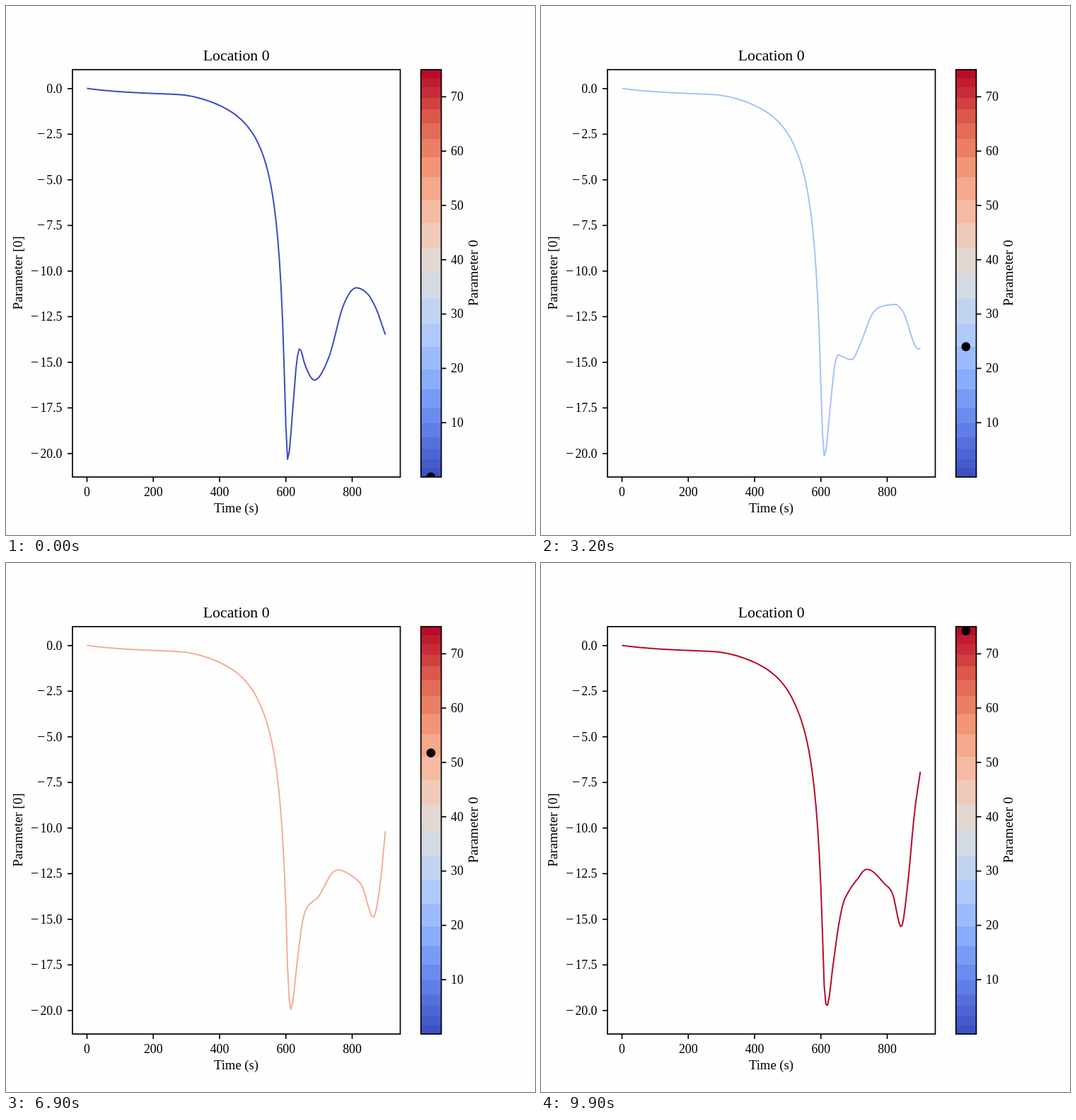
Animation, 748 px wide and 748 px high, one loop 10 s. Source, as an HTML page with a canvas:

```html
<!DOCTYPE html>
<html lang="en">
<head>
<meta charset="utf-8">
<title>Location 0</title>
<style>
html, body { margin: 0; width: 100%; height: 100%; overflow: hidden; background: #fefefe; }
canvas { display: block; }
</style>
</head>
<body>
<canvas id="stage" width="748" height="748"></canvas>
<script>
const ctx = document.getElementById('stage').getContext('2d');
const INK = '#000', PAPER = '#fefefe';
const LEFT = 94, TOP = 90, BOTTOM = 666, HEIGHT = BOTTOM - TOP;
const BAR = { x: 586.7, w: 28.8 };
const X0 = 114.5, STEP = 2.34375, SAMPLES = 180;
const FRAMES = 100, BANDS = 24;
const STOPS = [0x3b4cc0, 0x6282ea, 0x8db0fe, 0xb8d0f9, 0xdddddd, 0xf5c4ad, 0xf49a7b, 0xde604d, 0xb40426];

// Key points after the trough: x from, x to, y from, y to, bend on the way
const SHOULDER = [
  [406.3, 414.1, 560, 560, 0],
  [410.3, 421.3, 510, 510, 0],
  [415.2, 427, 484.5, 482, 38],
  [423, 434, 508, 466, 8],
  [436, 443, 529, 452, -18],
  [456, 449, 498, 444.5, -28],
  [478, 455, 421, 436, 41],
  [495, 461, 398.5, 433, 64]
];
const ENDING = [
  [513, 485, 409, 453, 10],
  [520, 497, 421, 468, -12],
  [552, 509, 492, 515, -50],
  [561, 518, 470, 456, 0],
  [570, 527.5, 400, 356, 0],
  [580, 538, 340, 282, 0]
];

const lerp = (a, b, t) => a + (b - a) * t;
const clamp = v => Math.max(0, Math.min(1, v));
const smooth = t => t * t * (3 - 2 * t);

function coolwarm(v) {
  const p = v * (STOPS.length - 1), i = Math.min(Math.floor(p), STOPS.length - 2);
  const mix = shift => Math.round(lerp(STOPS[i] >> shift & 255, STOPS[i + 1] >> shift & 255, p - i));
  return `rgb(${mix(16)},${mix(8)},${mix(0)})`;
}

// Monotone cubic interpolation: extrema lie only on the given points.
function spline(points) {
  const last = points.length - 1;
  const h = i => points[i + 1][0] - points[i][0];
  const sec = i => (points[i + 1][1] - points[i][1]) / h(i);
  const slope = i => {
    if (i === 0) return sec(0);
    if (i === last) return sec(last - 1);
    const a = sec(i - 1), b = sec(i);
    if (a * b <= 0) return 0;
    const p = (a * h(i) + b * h(i - 1)) / (h(i - 1) + h(i));
    return Math.sign(a) * Math.min(2 * Math.abs(a), 2 * Math.abs(b), Math.abs(p));
  };
  return x => {
    let i = 0;
    while (i < last - 1 && x > points[i + 1][0]) i++;
    const t = (x - points[i][0]) / h(i), u = 1 - t;
    return lerp(points[i][1], points[i + 1][1], smooth(t))
      + h(i) * t * u * (u * slope(i) - t * slope(i + 1));
  };
}

// A gentle saturating start that blends into a hyperbolic fall
function fall(x, drift) {
  const start = 116.5 + 10 * (1 - Math.exp((X0 - x) / 75));
  const pole = 405 + drift * clamp((x - 360) / 50);
  const plunge = 93 + 4900 / (pole - x);
  const blend = 1.5;
  return start + blend * Math.log1p(Math.exp((plunge - start) / blend));
}

function curveAt(u) {
  const early = u ** .75, drift = 5.8 * early;
  const trough = 398.2 + drift, join = trough - 4.5;
  const place = ease => ([xa, xb, ya, yb, bend]) =>
    [lerp(xa, xb, early), lerp(ya, yb, ease) + bend * early * (1 - early)];
  const tail = spline([
    [join - 2, fall(join - 2, drift)],
    [join, fall(join, drift)],
    [trough, lerp(641, 627, u)],
    ...SHOULDER.map(place(u)),
    ...ENDING.map(place(smooth(u)))
  ]);
  return x => x < join ? fall(x, drift) : tail(x);
}

function line(x1, y1, x2, y2) {
  ctx.beginPath();
  ctx.moveTo(x1, y1);
  ctx.lineTo(x2, y2);
  ctx.stroke();
}

function label(text, x, y, size, align = 'center', turned = false) {
  ctx.save();
  ctx.translate(x, y);
  if (turned) ctx.rotate(-Math.PI / 2);
  ctx.font = `${size}px "Liberation Serif", serif`;
  ctx.textAlign = align;
  ctx.fillText(text, 0, 0);
  const width = ctx.measureText(text).width;
  ctx.restore();
  return width;
}

function drawAxes() {
  ctx.strokeStyle = ctx.fillStyle = INK;
  ctx.lineWidth = 1.7;
  ctx.strokeRect(LEFT, TOP, 463.5, HEIGHT);
  ctx.strokeRect(BAR.x, TOP, BAR.w, HEIGHT);
  for (let s = 0; s <= 800; s += 200) {
    const x = X0 + s * .46875;
    line(x, BOTTOM, x, BOTTOM + 7);
    label(String(s), x, 692.5, 17.8);
  }
  for (let v = 0; v <= 20; v += 2.5) {
    const y = 116.8 + v * 25.8;
    line(LEFT - 7, y, LEFT, y);
    const width = label(v.toFixed(1), 79.5, y + 5.8, 17.8, 'right');
    if (v) label('−', 77.5 - width, y + 5.8, 20, 'right');
  }
  for (let v = 10; v <= 70; v += 10) {
    const y = BOTTOM - v * 7.68, x = BAR.x + BAR.w;
    line(x, y, x + 7, y);
    label(String(v), 629, y + 5.8, 17.8, 'left');
  }
  label('Location 0', 325.7, 77, 21.8);
  label('Time (s)', 325.5, 716, 18.7);
  label('Parameter [0]', 22.5, 377.5, 19, 'center', true);
  label('Parameter 0', 667, 377.5, 19.5, 'center', true);
}

function drawBar(u) {
  // Bands are thin at both ends and thick in the middle.
  const edge = i => {
    const s = i / BANDS;
    return s - .5 * Math.sin(2 * Math.PI * s) / (2 * Math.PI);
  };
  ctx.save();
  ctx.beginPath();
  ctx.rect(BAR.x, TOP, BAR.w, HEIGHT);
  ctx.clip();
  for (let i = 0; i < BANDS; i++) {
    const low = edge(i), high = edge(i + 1);
    ctx.fillStyle = coolwarm((low + high) / 2);
    const y = Math.round(BOTTOM - high * HEIGHT);
    ctx.fillRect(BAR.x, y, BAR.w, Math.round(BOTTOM - low * HEIGHT) - y);
  }
  ctx.fillStyle = INK;
  ctx.beginPath();
  ctx.arc(600.8, BOTTOM - u * HEIGHT, 6.4, 0, 2 * Math.PI);
  ctx.fill();
  ctx.restore();
}

function drawCurve(u) {
  const curve = curveAt(u);
  ctx.save();
  ctx.strokeStyle = coolwarm(u);
  ctx.lineWidth = 2;
  ctx.lineJoin = 'round';
  ctx.beginPath();
  for (let i = 0; i <= SAMPLES; i++) {
    const x = X0 + i * STEP;
    ctx.lineTo(x, curve(x));
  }
  ctx.stroke();
  ctx.restore();
}

function draw(now) {
  const u = Math.floor(now / 100) % FRAMES / FRAMES;
  ctx.fillStyle = PAPER;
  ctx.fillRect(0, 0, 748, 748);
  drawBar(u);
  drawCurve(u);
  drawAxes();
  requestAnimationFrame(draw);
}
draw(performance.now());
</script>
</body>
</html>
```
